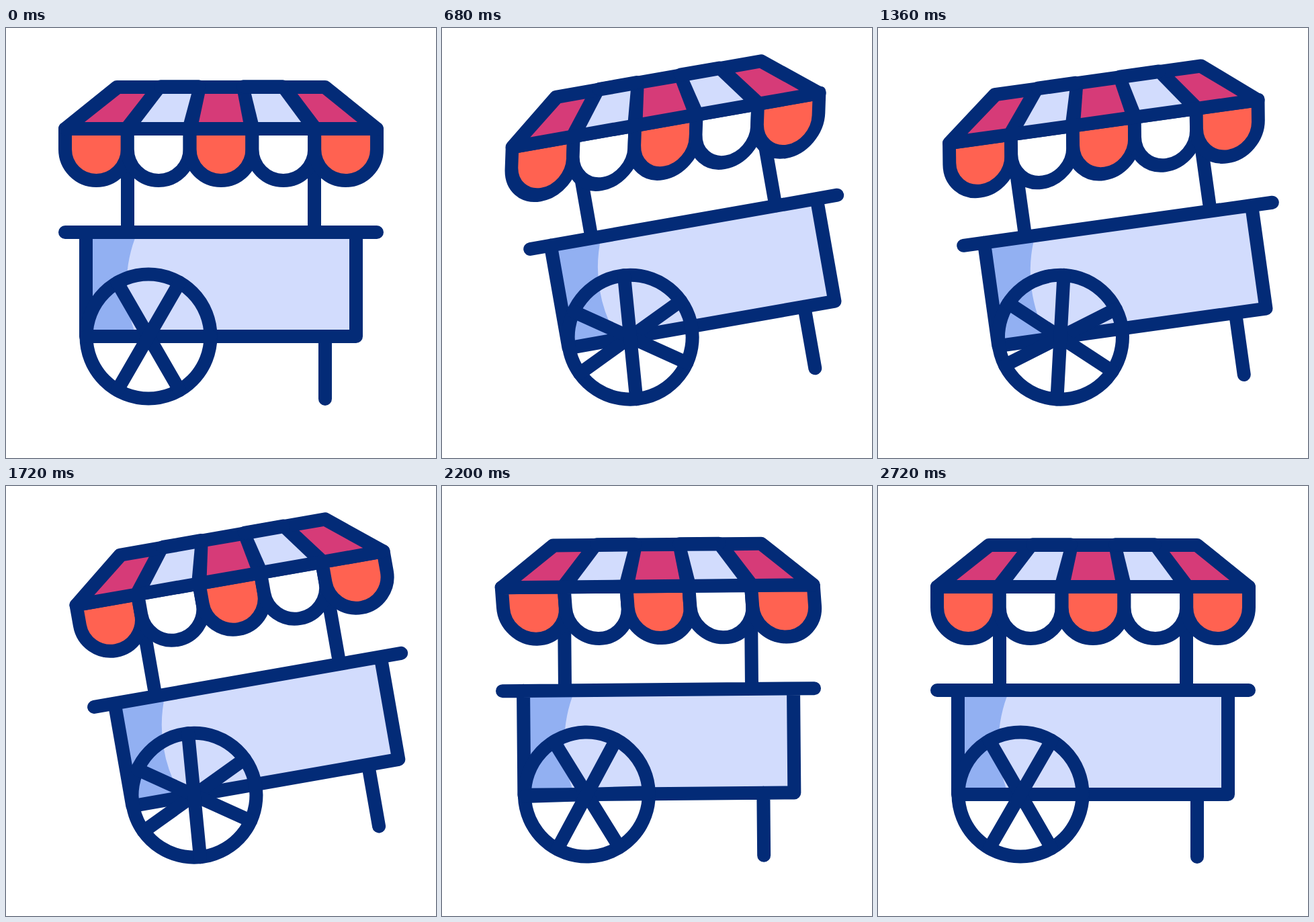
These frames come from a looping animation (640x640 px, 3000 ms). An HTML page:

```html
<!DOCTYPE html>
<html lang="en">
<head>
<meta charset="utf-8">
<title>Rolling cart</title>
<style>
  html, body { margin: 0; width: 100%; height: 100%; overflow: hidden; background: #fff; }
  svg { display: block; width: 100vw; height: 100vh; }
  .line { fill: none; stroke: #032b77; stroke-width: 20; stroke-linecap: round; stroke-linejoin: round; }
</style>
</head>
<body>
<svg viewBox="0 0 640 640">
  <g id="cart">
    <g id="body">
      <path fill="#d2dcfd" d="M119 304H521V459H119Z"/>
      <path fill="#92b0f2" d="M119 304H195.500A204 204 0 0 0 194 459H119Z"/>
      <path class="line" d="M119 304V459H521V304M88 304H552M475 459V552M181 190V304M459 190V304"/>
      <g id="valance"></g>
      <path class="line" style="fill:#032b77" d="M165 88H475L552 150H88Z"/>
      <path class="line" d="M230 87.300H287M353 87.300H412"/>
      <g id="roof"></g>
    </g>
    <g id="wheel">
      <circle class="line" cx="212" cy="459" r="92.500"/>
    </g>
  </g>
</svg>
<script>
const LOOP = 3000;
const $ = id => document.getElementById(id);

function add(parent, d, attrs) {
  const path = document.createElementNS("http://www.w3.org/2000/svg", "path");
  path.setAttribute("d", d);
  for (const name in attrs) path.setAttribute(name, attrs[name]);
  parent.append(path);
}

// Five stripes and scallops, counted outwards from the middle
for (let k = -2; k <= 2; k++) {
  const odd = k % 2 !== 0;
  const top = 320.5 + 66 * k, topHalf = 24.5 - 3 * Math.abs(k);
  const low = 320 + 87.2 * k, lowHalf = 33 - 1.1 * k * k;
  add($("roof"),
    `M${top - topHalf} 98H${top + topHalf}L${low + lowHalf} 140H${low - lowHalf}Z`,
    { fill: odd ? "#d2dcfd" : "#d63b78" });
  add($("valance"),
    `M${273.6 + 92.8 * k} 150v30.600a46.400 46.400 0 0 0 92.800 0V150Z`,
    { class: "line", style: `fill:${odd ? "#fff" : "#ff6251"}` });
}

for (let a = 0; a < 180; a += 60) {
  add($("wheel"), "M119.500 459H304.500", { class: "line", transform: `rotate(${a} 212 459)` });
}

const part = (t, from, to) => Math.min(1, Math.max(0, (t - from) / (to - from)));

// Smooth step from 0 to 1
function ease(t, from, to) {
  const u = part(t, from, to), a = u ** 2.18, b = (1 - u) ** 2.18;
  return a / (a + b);
}

// Smooth bump from 0 to 1 and back
const bump = (t, from, to) => Math.sin(Math.PI * part(t, from, to)) ** 2;

function draw(t) {
  const lift = ease(t, 160, 720) - ease(t, 1660, 2340);
  const dip = bump(t, 700, 1660);
  const kick = bump(t, 2230, 2500);

  const x = 68.4 * lift - 13 * dip - 6.1 * kick;
  const tilt = -10 * lift + 3 * dip - 3.6 * kick;
  const spin = -35.8 * lift + 13 * dip;
  const sway = -12 * bump(t, 260, 1080) - 7.3 * bump(t, 1060, 1640)
    + 7 * bump(t, 1700, 2380) - 2.5 * bump(t, 2370, 2530) + 1.5 * bump(t, 2530, 2720);

  const set = (id, value) => $(id).setAttribute("transform", value);
  set("cart", `translate(${x} ${1.2 * lift})`);
  set("body", `rotate(${tilt} 212 459)`);
  set("wheel", `rotate(${spin} 212 459)`);
  set("valance", `translate(0 150) skewX(${sway}) translate(0 -150)`);
}

const start = performance.now();
function tick() {
  draw((performance.now() - start) % LOOP);
  requestAnimationFrame(tick);
}
tick();
</script>
</body>
</html>
```
